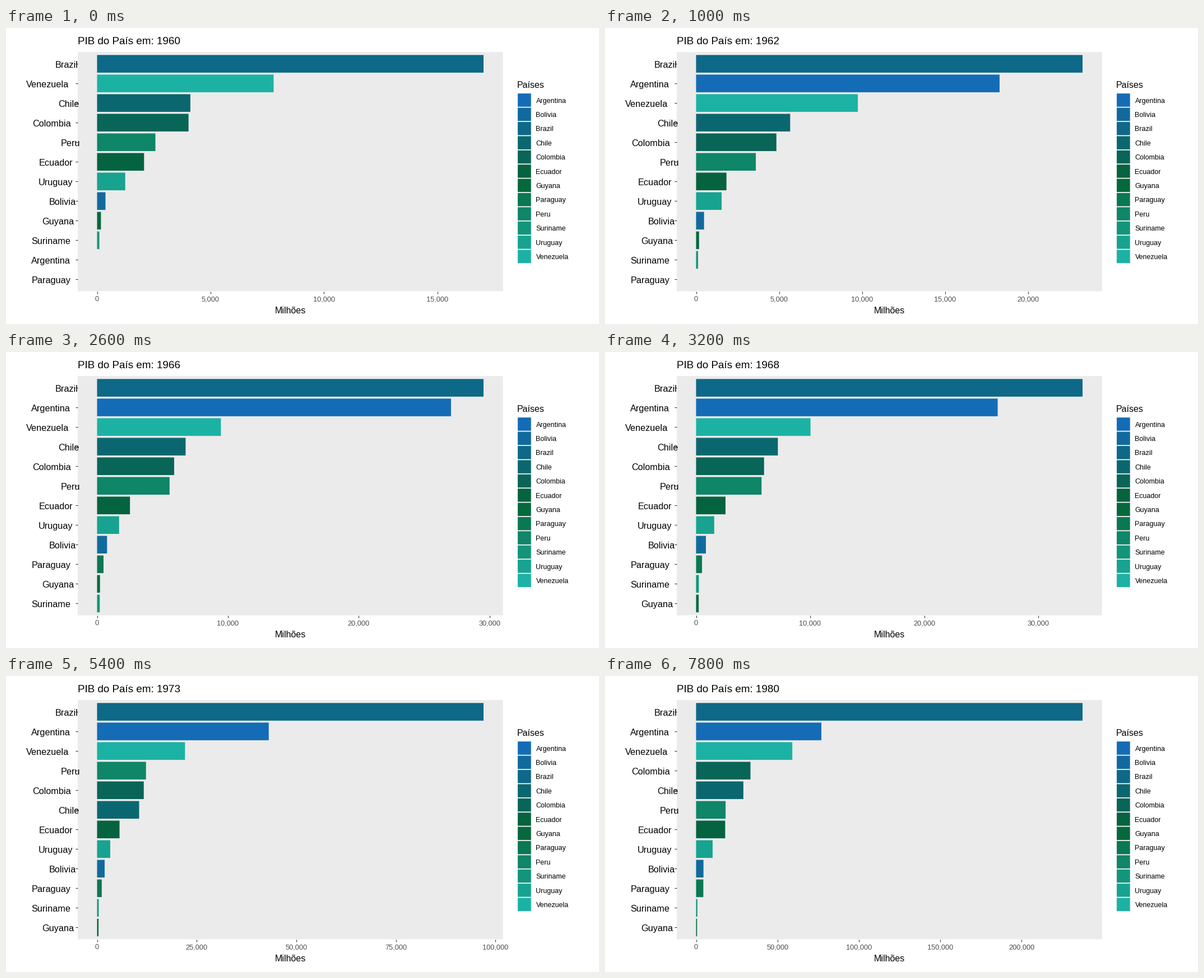
A matplotlib script for the animation above (8 s loop, 1058 by 529 pixels).

```python
import numpy as np
import matplotlib.pyplot as plt
from matplotlib.animation import FuncAnimation
from matplotlib.patches import Rectangle

W, H, DPI = 1058, 529, 100
FRAMES, STEP_MS = 40, 200
YEARS_PER_FRAME = 0.5164
FIRST_YEAR, SPAN = 1960, 21

LEFT, RIGHT, TOP, BOTTOM = 128, 886.5, 43, 470.5   # panel
ZERO, BAR_END = 162.5, 852
ROW = (BOTTOM - TOP) / 12.2
LABEL_X, LABEL_HJUST = 147.7, 1.465

# Years since the start at which each economy's size is given
KEY_YEARS = (0, 3, 5, 8, 11, 16, 20)

plt.rcParams["font.family"] = "Liberation Sans"
fig = plt.figure(figsize=(W / DPI, H / DPI), dpi=DPI, facecolor="white")
ax = fig.add_axes([0, 0, 1, 1])
ax.set_xlim(0, W)
ax.set_ylim(H, 0)
ax.axis("off")


def rect(x, y, w, h, color, z=1):
    return ax.add_patch(Rectangle((x, y), w, h, fc=color, lw=0, zorder=z,
                                  snap=False))


def text(x, y, s, px, color="black", ha="left"):
    return ax.text(x, y, s, fontsize=px * 72 / DPI, color=color, ha=ha,
                   va="baseline", zorder=5)


def tick(xs, ys):
    return ax.plot(xs, ys, color="#333333", lw=0.8, zorder=4,
                   solid_capstyle="butt")[0]


def row_y(rank):
    return TOP + ROW * (0.6 + rank)


def ramp(i):
    """Blue to dark green to teal over the twelve countries."""
    stops = ((20, 3, 27), (108, 98, 178), (182, 52, 164))
    return [np.interp(i, (0, 5.5, 11), s) / 255 for s in stops]


class Country:
    """One bar and its label; sizes grow exponentially between key years."""

    def __init__(self, index, name, since, *sizes):
        self.name, self.color = name, ramp(index)
        years = [since] + [y for y in KEY_YEARS if y > since]
        span = np.arange(SPAN)
        growth = np.exp(np.interp(span, years, np.log(sizes)))
        self.sizes = np.where(span < since, 0, growth)
        self.bar = rect(ZERO, 0, 0, ROW * 0.9, self.color, 2)
        self.label = text(0, 0, name, 16.3)
        width = self.label.get_window_extent().width
        self.label.set_x(LABEL_X - LABEL_HJUST * width)

    def place(self, rank, size, top):
        y = row_y(rank)
        self.bar.set_y(y - ROW * 0.45)
        self.bar.set_width((BAR_END - ZERO) * size / top)
        self.bar.set_visible(size > 0)
        self.label.set_y(y + 6.8)


rect(LEFT, TOP, RIGHT - LEFT, BOTTOM - TOP, "#EBEBEB")

countries = [Country(i, *row) for i, row in enumerate([
    ("Argentina", 2, 24.45, 18.29, 28.34, 26.44, 33.29, 51.17, 76.96),
    ("Bolivia", 0, 0.37, 0.48, 0.6, 0.86, 1.1, 2.73, 4.54),
    ("Brazil", 0, 17.03, 23.29, 22.47, 33.88, 48.87, 153.2, 237.4),
    ("Chile", 0, 4.11, 5.67, 6.03, 7.17, 10.88, 10.34, 29.04),
    ("Colombia", 0, 4.03, 4.84, 5.76, 5.96, 7.82, 15.34, 33.4),
    ("Ecuador", 0, 2.07, 1.83, 2.39, 2.58, 2.75, 9.09, 17.88),
    ("Guyana", 0, 0.17, 0.18, 0.21, 0.23, 0.28, 0.45, 0.6),
    ("Paraguay", 5, 0.44, 0.52, 0.67, 1.7, 4.45),
    ("Peru", 0, 2.57, 3.6, 5.17, 5.74, 8.29, 15.95, 18.13),
    ("Suriname", 0, 0.1, 0.12, 0.15, 0.24, 0.3, 0.51, 0.8),
    ("Uruguay", 0, 1.24, 1.54, 1.89, 1.59, 2.81, 3.67, 10.16),
    ("Venezuela", 0, 7.78, 9.75, 8.43, 10.03, 12.99, 31.42, 59.12),
])]

# Fixed parts: row ticks, axis title and legend
for i in range(12):
    tick([LEFT - 4, LEFT], [row_y(i)] * 2)
text(507, 509.5, "Milhões", 16, ha="center")
text(911.7, 107, "Países", 16)
KEY, GAP = 25.4, 0.9
for i, c in enumerate(countries):
    y = 116.2 + KEY * i
    rect(912.2, y, KEY, KEY, "#F5F5F5")
    rect(912.2 + GAP, y + GAP, KEY - 2 * GAP, KEY - 2 * GAP, c.color, 2)
    text(945.5, y + 17.5, c.name, 12.5)

title = text(127.6, 29, "", 18.9)
x_ticks = [(tick([0, 0], [BOTTOM, BOTTOM + 4]),
            text(0, 488.4, "", 12.8, "#4D4D4D", "center")) for _ in range(9)]


def tick_step(top):
    """Round axis step with the best mix of simplicity, coverage, density."""
    low, high = -0.05 * top, 1.05 * top
    best = (-9, 1)
    for rank, q in enumerate((1, 5, 2, 2.5, 4, 3)):
        for power in (0, 1, 2):
            step = q * 10 ** power
            n0 = int(high // step)
            for n in (n0, n0 + 1):
                if n < 1:
                    continue
                end = n * step
                miss = (high - end) ** 2 + low ** 2
                cover = 1 - 0.5 * miss / (0.1 * (high - low)) ** 2
                ratio = (max(end, high) - low) / (4 * step)
                density = 2 - max(ratio, 1 / ratio)
                score = 0.25 * (1 - rank / 5) + 0.2 * cover + 0.5 * density
                best = max(best, (score, step))
    return best[1]


def update(frame):
    time = frame * YEARS_PER_FRAME
    year = round(time)
    title.set_text(f"PIB do País em: {FIRST_YEAR + int(time)}")

    ranked = sorted(countries, key=lambda c: -c.sizes[year])
    top = ranked[0].sizes[year]
    for rank, c in enumerate(ranked):
        c.place(rank, c.sizes[year], top)

    step = tick_step(top)
    for i, (mark, label) in enumerate(x_ticks):
        x = ZERO + (BAR_END - ZERO) * i * step / top
        mark.set_xdata([x, x])
        label.set_x(x)
        label.set_text(f"{i * step * 1000:,.0f}")
        for part in (mark, label):
            part.set_visible(x <= RIGHT)
    return []


anim = FuncAnimation(fig, update, frames=FRAMES, interval=STEP_MS,
                     init_func=lambda: update(0), repeat=True, repeat_delay=0)
plt.show()
```
